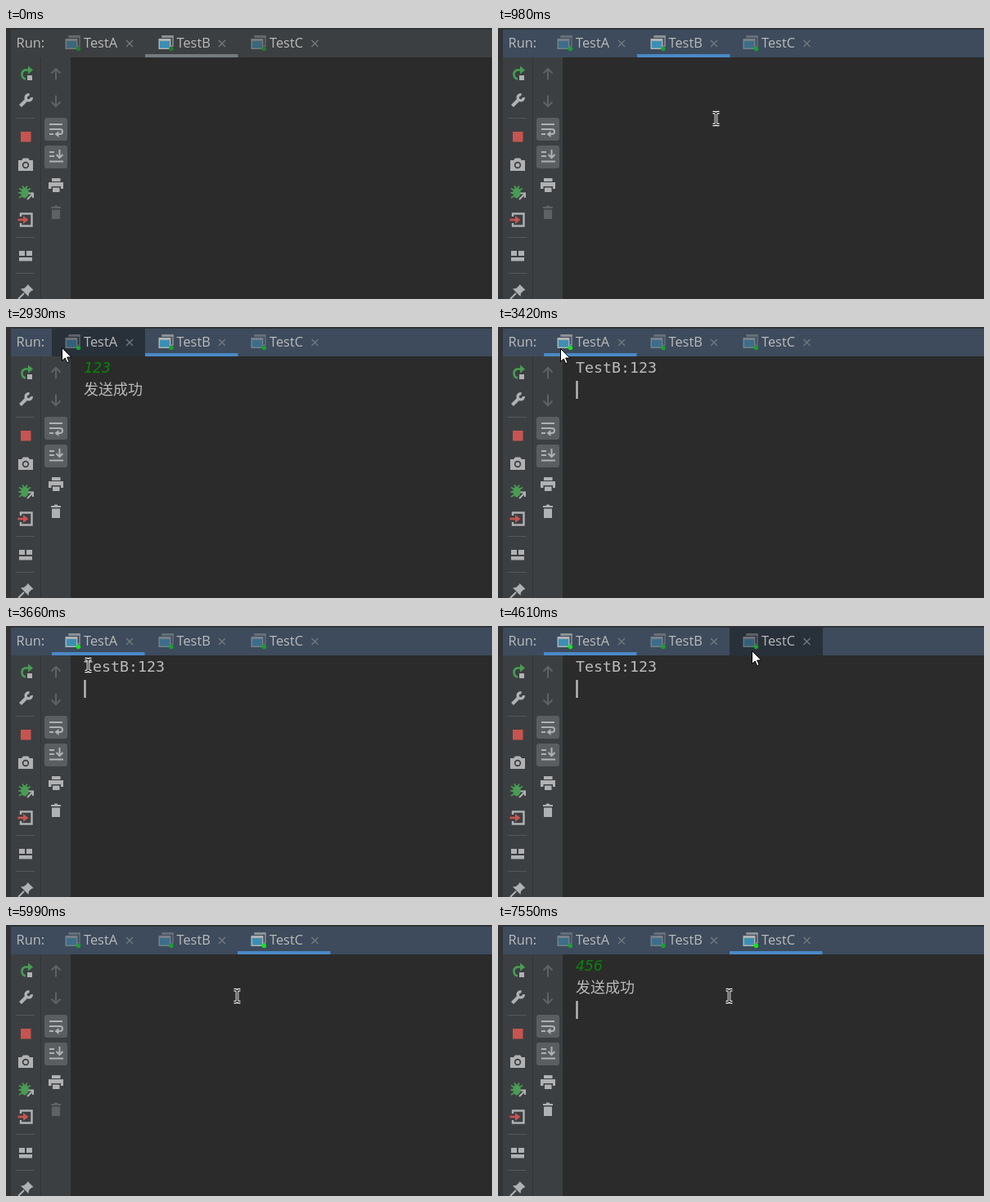
Animation of 594x332 px, one loop 8 s. Source, as an HTML page:

```html
<!DOCTYPE html>
<html lang="en">
<head>
<meta charset="utf-8">
<title>Run console</title>
<style>
html, body { margin: 0; width: 100%; height: 100%; overflow: hidden; background: #2b2b2b; }
svg { display: block; width: 594px; height: 332px; }
.ui { font: 16.4px "Open Sans", "Noto Sans", sans-serif; fill: #bbb; }
.mono { font: 18.27px "DejaVu Sans Mono", monospace; fill: #bbb; }
.typed { font-style: italic; fill: #098209; }
.cjk { font: 300 18px "Noto Sans CJK SC", "Noto Sans CJK", sans-serif; fill: #bbb; }
.ico { fill: #afb1b3; }
.line { fill: none; stroke: #afb1b3; stroke-width: 2; }
.off { stroke: #5f6264; }
.green { fill: #499c54; }

/* Every track lasts one loop and holds between its keys; 1% = 80 ms */
.t { animation: 8s step-end infinite; }

.header { animation-name: header; }
@keyframes header { 0% { fill: #3c3f41 } 6.5%, 100% { fill: #3d4b5c } }
.under { animation-name: under; }
@keyframes under {
  0% { transform: translateX(170px); fill: #747a80 }
  6.5% { transform: translateX(170px); fill: #4a88c7 }
  41.75% { transform: translateX(56px); fill: #4a88c7 }
  60.375%, 100% { transform: translateX(283px); fill: #4a88c7 }
}
.hover { animation-name: hover; }
@keyframes hover {
  0% { transform: translateX(56px); opacity: 0 }
  36.625% { transform: translateX(56px); opacity: 1 }
  41.75% { transform: translateX(283px); opacity: 0 }
  47.625% { transform: translateX(283px); opacity: 1 }
  60.375%, 100% { transform: translateX(283px); opacity: 0 }
}

.icoA { animation-name: icoA; }
.icoB { animation-name: icoB; }
.icoC { animation-name: icoC; }
@keyframes icoA { 0% { opacity: .52 } 41.75% { opacity: 1 } 60.375%, 100% { opacity: .52 } }
@keyframes icoB { 0% { opacity: 1 } 41.75%, 100% { opacity: .52 } }
@keyframes icoC { 0% { opacity: .52 } 60.375%, 100% { opacity: 1 } }
.dotA { animation-name: dotA; }
.dotB { animation-name: dotB; }
.dotC { animation-name: dotC; }
@keyframes dotA { 0% { fill: #227d2b } 6.5% { fill: #18a030 } 41.75% { fill: #0ee61a } 60.375%, 100% { fill: #18a030 } }
@keyframes dotB { 0% { fill: #227d2b } 6.5%, 100% { fill: #18a030 } }
@keyframes dotC { 0% { fill: #227d2b } 6.5% { fill: #18a030 } 60.375%, 100% { fill: #0ee61a } }

.trash { animation-name: trash; }
@keyframes trash {
  0% { fill: #5f6264 } 24.875% { fill: #afb1b3 }
  60.375% { fill: #5f6264 } 93.375%, 100% { fill: #afb1b3 }
}

.outA { animation-name: outA; }
.outB { animation-name: outB; }
@keyframes outA { 0% { opacity: 0 } 41.75% { opacity: 1 } 60.375%, 100% { opacity: 0 } }
@keyframes outB { 0% { opacity: 1 } 41.75%, 100% { opacity: 0 } }
.b1 { animation-name: b1; }
.b2 { animation-name: b2; }
.b3 { animation-name: b3; }
.b4 { animation-name: b4; }
.c1 { animation-name: c1; }
.c2 { animation-name: c2; }
.c3 { animation-name: c3; }
.c4 { animation-name: c4; }
@keyframes b1 { 0% { opacity: 0 } 16.125%, 100% { opacity: 1 } }
@keyframes b2 { 0% { opacity: 0 } 17%, 100% { opacity: 1 } }
@keyframes b3 { 0% { opacity: 0 } 18%, 100% { opacity: 1 } }
@keyframes b4 { 0% { opacity: 0 } 28.875%, 100% { opacity: 1 } }
@keyframes c1 { 0% { opacity: 0 } 83.625%, 100% { opacity: 1 } }
@keyframes c2 { 0% { opacity: 0 } 85.75%, 100% { opacity: 1 } }
@keyframes c3 { 0% { opacity: 0 } 86.625%, 100% { opacity: 1 } }
@keyframes c4 { 0% { opacity: 0 } 94.375%, 100% { opacity: 1 } }

.caret { animation-name: blink, caret; }
@keyframes blink {
  0% { opacity: 0 } 6.5% { opacity: 1 } 12.25% { opacity: 0 }
  16.125% { opacity: 1 } 24% { opacity: 0 }
  26.75% { opacity: 1 } 35.125% { opacity: 0 }
  41.75% { opacity: 1 } 48.625% { opacity: 0 }
  54.625% { opacity: 1 } 60.375% { opacity: 0 }
  64.125% { opacity: 1 } 74.875% { opacity: 0 }
  81.75% { opacity: 1 } 92.375% { opacity: 0 }
  94.375%, 100% { opacity: 1 }
}
@keyframes caret {
  0% { transform: translate(0, 0) }
  16.125% { transform: translate(11px, 0) }
  17% { transform: translate(22px, 0) }
  18% { transform: translate(33px, 0) }
  24% { transform: translate(0, 27px) }
  28.875% { transform: translate(0, 54px) }
  41.75% { transform: translate(0, 27px) }
  60.375% { transform: translate(0, 0) }
  83.625% { transform: translate(11px, 0) }
  85.75% { transform: translate(22px, 0) }
  86.625% { transform: translate(33px, 0) }
  94.375%, 100% { transform: translate(0, 54px) }
}

.mouse { animation-name: mouse; }
@keyframes mouse {
  0% { transform: translate(-40px, -40px) }
  .875% { transform: translate(575px, 300px); animation-timing-function: steps(6) }
  6.5% { transform: translate(283px, 139px) }
  10.375% { transform: translate(277px, 129px); animation-timing-function: steps(2) }
  12.25% { transform: translate(266.5px, 111px) }
  33.875% { transform: translate(217px, 90px); animation-timing-function: steps(3) }
  36.625% { transform: translate(68px, 25px); animation-timing-function: steps(3) }
  39.625% { transform: translate(70px, 19px) }
  42.75% { transform: translate(76px, 26px); animation-timing-function: steps(3) }
  45.75% { transform: translate(100.5px, 48px) }
  46.625% { transform: translate(150px, 42px); animation-timing-function: steps(3) }
  49.625% { transform: translate(345px, 22px) }
  54.625% { transform: translate(336px, 24px); animation-timing-function: steps(3) }
  57.625% { transform: translate(310px, 30px) }
  58.375% { transform: translate(306px, 27px) }
  61.3125% { transform: translate(303px, 32px); animation-timing-function: steps(3) }
  64.125% { transform: translate(277px, 85px) }
  65.125% { transform: translate(286px, 89px) }
  66.25% { transform: translate(280px, 86px) }
  67.25%, 100% { transform: translate(282.5px, 87px) }
}
.arrow { animation-name: arrow; }
.beam { animation-name: beam; }
@keyframes arrow {
  0% { opacity: 0 } 36.625% { opacity: 1 } 44.75% { opacity: 0 }
  47.625% { opacity: 1 } 62.25%, 100% { opacity: 0 }
}
@keyframes beam {
  0% { opacity: 1 } 36.625% { opacity: 0 } 44.75% { opacity: 1 }
  47.625% { opacity: 0 } 62.25%, 100% { opacity: 1 }
}
</style>
</head>
<body>
<svg viewBox="0 0 594 332">
  <defs>
    <g id="win">
      <path d="M5 1H18V13H16" fill="none" stroke="#8d9194" stroke-width="1.5"/>
      <path d="M4.300 0H18.700V3H4.300Z" fill="#8d9194"/>
      <path d="M.5 4H15.500V17H.5Z" fill="#afb1b3"/>
      <path d="M2 7H14V15.500H2Z" fill="#3b8fb5"/>
    </g>
    <path id="close" d="M-4-4 4 4M4-4-4 4" fill="none" stroke="#747a7f" stroke-width="1.3"/>
    <path id="rule" d="M12 0H35" stroke="#555859"/>
    <path id="tee" d="M-4-7.500H-1.500L0-6 1.500-7.500H4M0-6V6M-4 7.500H-1.500L0 6 1.500 7.500H4"/>
  </defs>

  <!-- panels -->
  <rect width="594" height="332" fill="#3c3f41"/>
  <rect width="594" height="2" fill="#303234"/>
  <rect class="t header" x="6" y="2" width="588" height="34"/>
  <rect width="6" height="332" fill="#313335"/>
  <rect x="42" y="36" width="1" height="296" fill="#323537"/>
  <rect x="79" y="36" width="515" height="296" fill="#2b2b2b"/>

  <!-- tabs -->
  <rect class="t hover" y="2" width="114" height="34" fill="#28303a"/>
  <rect class="t under" y="32" width="113.500" height="4"/>
  <g class="ui">
    <text x="12.500" y="24">Run:</text>
    <text x="95" y="24">TestA</text>
    <text x="208.500" y="24">TestB</text>
    <text x="322" y="24">TestC</text>
  </g>
  <g class="t icoA"><use href="#win" x="72" y="9"/></g>
  <g class="t icoB"><use href="#win" x="186" y="9"/></g>
  <g class="t icoC"><use href="#win" x="299" y="9"/></g>
  <circle class="t dotA" cx="88.500" cy="25.500" r="2.700"/>
  <circle class="t dotB" cx="202" cy="25.500" r="2.700"/>
  <circle class="t dotC" cx="315.500" cy="25.500" r="2.700"/>
  <use href="#close" x="151" y="19"/>
  <use href="#close" x="264" y="19"/>
  <use href="#close" x="377.500" y="19"/>

  <!-- left toolbar -->
  <path d="M24 62.500A5.800 5.800 0 0 1 23 51.500H28" fill="none" stroke="#499c54" stroke-width="2.600"/>
  <path class="green" d="M27 46.500 33 51.500 27 56.500Z"/>
  <rect class="ico" x="26" y="58" width="6" height="6"/>
  <path class="line" d="M17.500 95.500 25.500 87.500" stroke-width="4" style="stroke-width:4"/>
  <path class="line" d="M28.500 81.800A3.600 3.600 0 1 0 31.300 85" style="stroke-width:3.400"/>
  <use href="#rule" y="110.500"/>
  <rect x="18" y="127" width="12.500" height="12.500" fill="#c75450"/>
  <path class="ico" fill-rule="evenodd" d="M15 162H19L21 159.500H27L29 162H33V175H15ZM28.200 168A4.200 4.200 0 1 0 19.800 168 4.200 4.200 0 1 0 28.200 168Z"/>
  <circle class="ico" cx="24" cy="168" r="2.500"/>
  <ellipse class="green" cx="23" cy="202" rx="4.800" ry="6.500"/>
  <path d="M16 196.500 20 199M15.500 202H20M16 208 20 205.500M30 196.500 26 199M20 193.500 22 196.500M26 193.500 24 196.500" stroke="#499c54" stroke-width="1.800"/>
  <path d="M25 211 32 204" stroke="#3c3f41" stroke-width="5"/>
  <path class="line" d="M26 210 32 204M27.500 202.500H33V208"/>
  <path class="line" d="M18 231V227.500H31.500V242.500H18V239" style="stroke-width:2.400"/>
  <path d="M14.500 235H22" stroke="#c75450" stroke-width="2.600"/>
  <path d="M21 230 27.500 235 21 240Z" fill="#c75450"/>
  <use href="#rule" y="256.500"/>
  <path class="ico" d="M16 273H23V279H16ZM25 273H32V279H25ZM16 281H32V285.500H16Z"/>
  <use href="#rule" y="300.500"/>
  <path class="ico" d="M26.500 314 33.500 321 31 322 28 325 27.500 329 18 319.500 22 319 25.500 316Z"/>
  <path class="line" d="M22 325 15 332"/>

  <!-- console toolbar -->
  <path class="line off" d="M61 63.500V50M55.500 55.500 61 50 66.500 55.500"/>
  <path class="line off" d="M61 82.500V96M55.500 90.500 61 96 66.500 90.500"/>
  <rect x="47" y="110" width="28" height="28" rx="3" fill="#5a5e61"/>
  <rect x="47" y="144" width="28" height="28" rx="3" fill="#5a5e61"/>
  <path class="line" d="M53 118H69M53 124H66A3 3 0 0 1 66 130H63M53 130H58"/>
  <path class="ico" d="M64.500 126V134L59.500 130Z"/>
  <path class="line" d="M53 152H59M53 157H59M53 163.500H70M65.500 149V158M61.500 155 65.500 159 69.500 155"/>
  <path class="ico" d="M56 184H66.500V188H56ZM52 189H70V197H67V194H55.500V197H52ZM57 195.500H65.500V201H57Z"/>
  <path class="t trash" d="M55 219H58.500L59.500 217.500H62.500L63.500 219H67V221H55ZM56 222.500H66V234H56Z"/>

  <!-- console -->
  <g class="t outB">
    <text class="mono typed t b1" x="95" y="56">1</text>
    <text class="mono typed t b2" x="106" y="56">2</text>
    <text class="mono typed t b3" x="117" y="56">3</text>
    <text class="cjk t b4" x="95" y="83">发送成功</text>
  </g>
  <g class="t outA">
    <text class="mono" x="95" y="56">TestB:123</text>
  </g>
  <text class="mono typed t c1" x="95" y="56">4</text>
  <text class="mono typed t c2" x="106" y="56">5</text>
  <text class="mono typed t c3" x="117" y="56">6</text>
  <text class="cjk t c4" x="95" y="83">发送成功</text>
  <rect class="t caret" x="95.300" y="39" width="2.400" height="22" fill="#bbb"/>

  <g class="t mouse">
    <g class="t beam" fill="none">
      <use href="#tee" stroke="#fff" stroke-width="3.400"/>
      <use href="#tee" stroke="#000" stroke-width="1.200"/>
    </g>
    <path class="t arrow" d="M.5.500V16.500L4.200 13 6.700 18.700 9.200 17.600 6.700 12H11.800Z" fill="#fff" stroke="#000"/>
  </g>
</svg>
</body>
</html>
```
